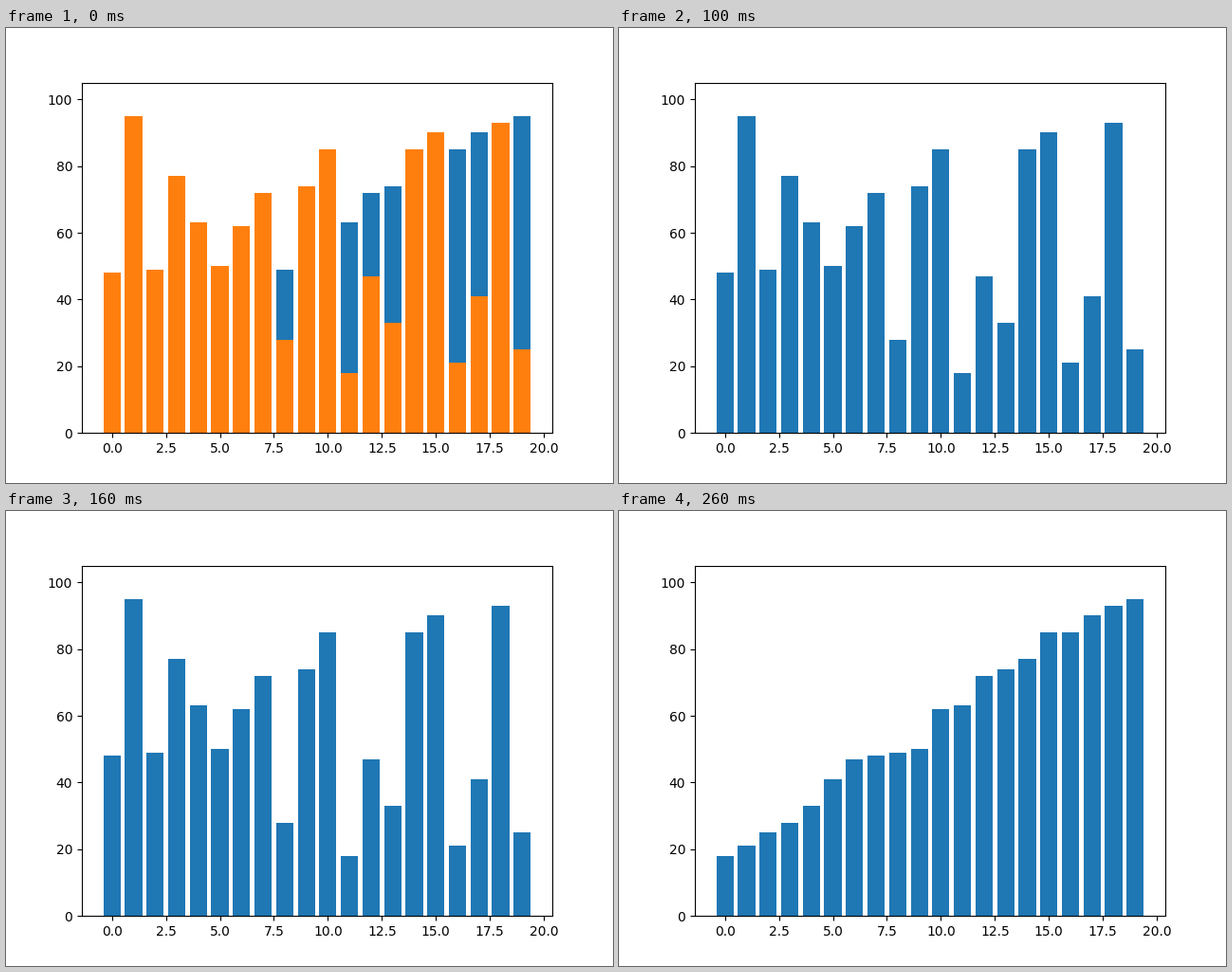
A matplotlib script that plays this animation: 640 by 480 pixels, repeating every 0.3 s.

```python
import matplotlib.pyplot as plt
from matplotlib.animation import FuncAnimation

values = [48, 95, 49, 77, 63, 50, 62, 72, 28, 74,
          85, 18, 47, 33, 85, 90, 21, 41, 93, 25]
ordered = sorted(values)
x = range(len(values))

fig, ax = plt.subplots(figsize=(6.4, 4.8), dpi=100)
back = ax.bar(x, ordered, color="C0")
front = ax.bar(x, values, color="C1")
ax.set_ylim(0, 105)


def set_heights(bars, heights):
    for bar, height in zip(bars, heights):
        bar.set_height(height)


def update(step):
    # Both orders overlaid, then unsorted, then sorted
    set_heights(back, values if step == 1 else ordered)
    for bar in front:
        bar.set_visible(step == 0)
    return [*back, *front]


anim = FuncAnimation(fig, update, frames=3, interval=100,
                     repeat=True, repeat_delay=0)
plt.show()
```
